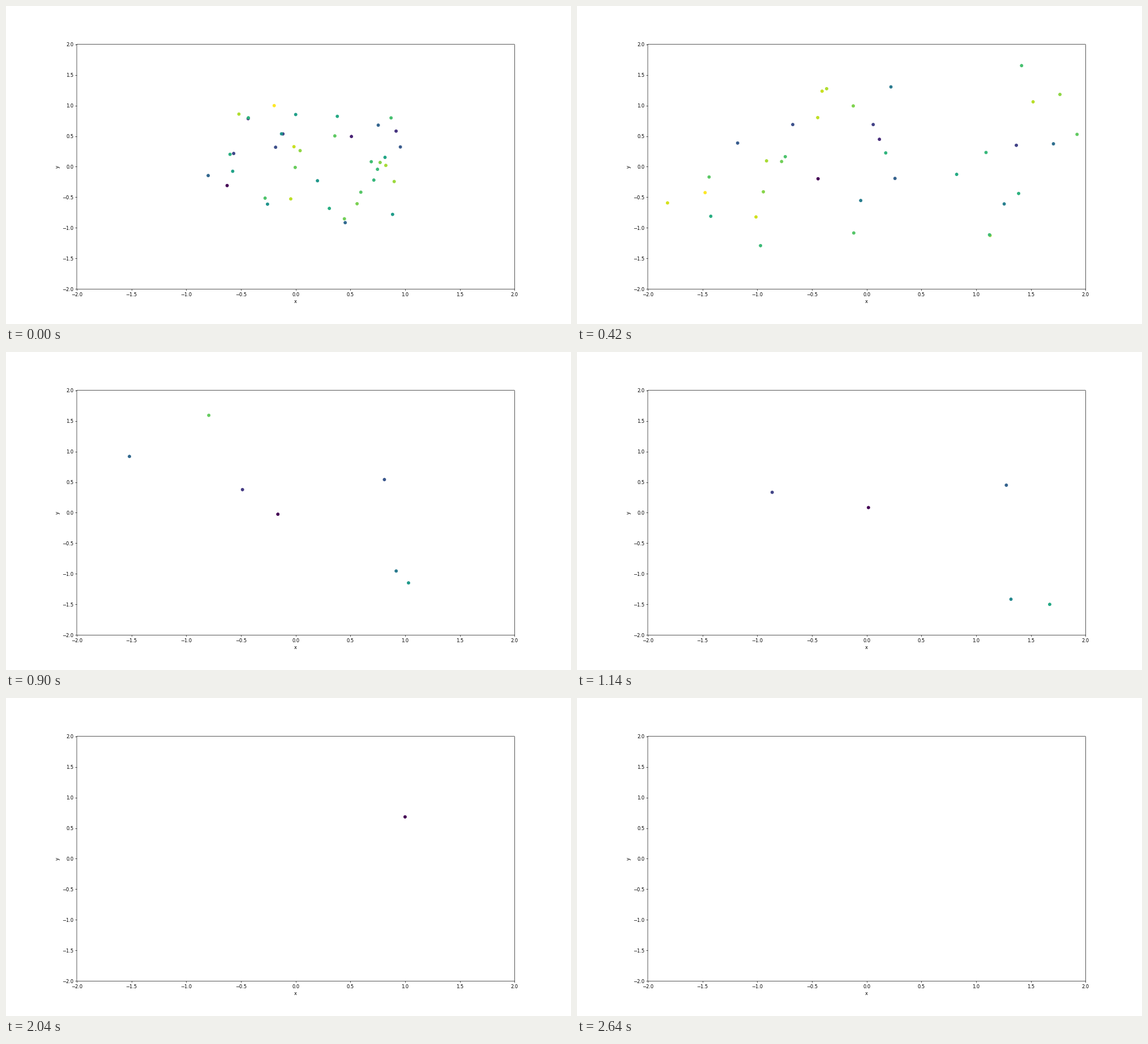
Animation, 998 px wide and 561 px high, one loop 8 s. Source, as a matplotlib script:

```python
import numpy as np
import matplotlib.pyplot as plt
from matplotlib.animation import FuncAnimation

W, H, DPI = 998, 561, 60
LIMIT = 2.0
STEP_MS, TICK_MS, LOOP_MS = 60, 20, 8000
STEPS = 44        # by then every particle has left the box
PROBE = 7         # number of steps over which travel is given
COUNT = 40

# Speeds grow exponentially and level off at TOP (data units per step).
GROWTH, TOP, SHARPNESS = 0.0408, 0.285, 2.2

# The slow particles that stay longest, and the fastest one:
# x, y and the travel in x and y during the first PROBE steps.
KEY = np.array([
    (-0.626, -0.308, 0.182, 0.111),
    (0.510, 0.494, -0.393, -0.046),
    (-0.434, 0.786, 0.494, -0.097),
    (0.918, 0.582, 0.450, -0.232),
    (-0.116, 0.536, -0.559, 0.153),
    (-0.566, 0.216, -0.613, 0.171),
    (-0.183, 0.318, 0.442, -0.510),
    (0.957, 0.323, 0.750, 0.051),
    (0.755, 0.679, -0.533, 0.626),
    (-0.799, -0.145, 0.745, -0.408),
    (0.453, -0.915, 0.804, 0.306),
    (-0.196, 0.999, -1.280, -1.423),
])


def random_particles(n, rng):
    """Fast particles spread over the inner square, in any direction."""
    spot = rng.uniform(-0.93, 0.93, (n, 2))
    angle = rng.uniform(0, 2 * np.pi, n)
    reach = rng.permutation(np.linspace(1.16, 1.8, n))
    return np.column_stack([spot, reach * np.cos(angle), reach * np.sin(angle)])


def speed_curve(drive):
    """Speed at every step (rows) for each initial drive (columns)."""
    t = np.arange(STEPS + 1)[:, None]
    z = drive * np.exp(GROWTH * t)
    return TOP * z / (1 + z ** SHARPNESS) ** (1 / SHARPNESS)


def distance(speed):
    """Path length covered up to every step."""
    mean = (speed[1:] + speed[:-1]) / 2
    return np.vstack([np.zeros(speed.shape[1]), np.cumsum(mean, axis=0)])


others = random_particles(COUNT - len(KEY), np.random.default_rng(4))
particles = np.vstack([KEY, others])
start, offset = particles[:, :2], particles[:, 2:]
reach = np.hypot(offset[:, 0], offset[:, 1])
heading = offset / reach[:, None]

# Find the drive that gives each particle its travel.
trial = np.geomspace(0.02, 8, 600)
drive = np.interp(reach, distance(speed_curve(trial))[PROBE], trial)
speed = speed_curve(drive)
path = distance(speed)

fig, ax = plt.subplots(figsize=(W / DPI, H / DPI), dpi=DPI)
fig.subplots_adjust(left=125 / W, top=1 - 67.7 / H)
for side in ("left", "top"):
    ax.spines[side].set_snap(False)
ax.set_xlim(-LIMIT, LIMIT)
ax.set_ylim(-LIMIT, LIMIT)
ax.set_xlabel("x")
ax.set_ylabel("y")
dots = ax.scatter(start[:, 0], start[:, 1], c=speed[0], cmap="viridis")


def update(i):
    step = min(i * TICK_MS // STEP_MS, STEPS)
    dots.set_offsets(start + heading * path[step][:, None])
    dots.set_array(speed[step])
    dots.set_clim(speed[step].min(), speed[step].max())
    return (dots,)


anim = FuncAnimation(fig, update, frames=LOOP_MS // TICK_MS,
                     interval=TICK_MS, repeat=True, repeat_delay=0)
plt.show()
```
